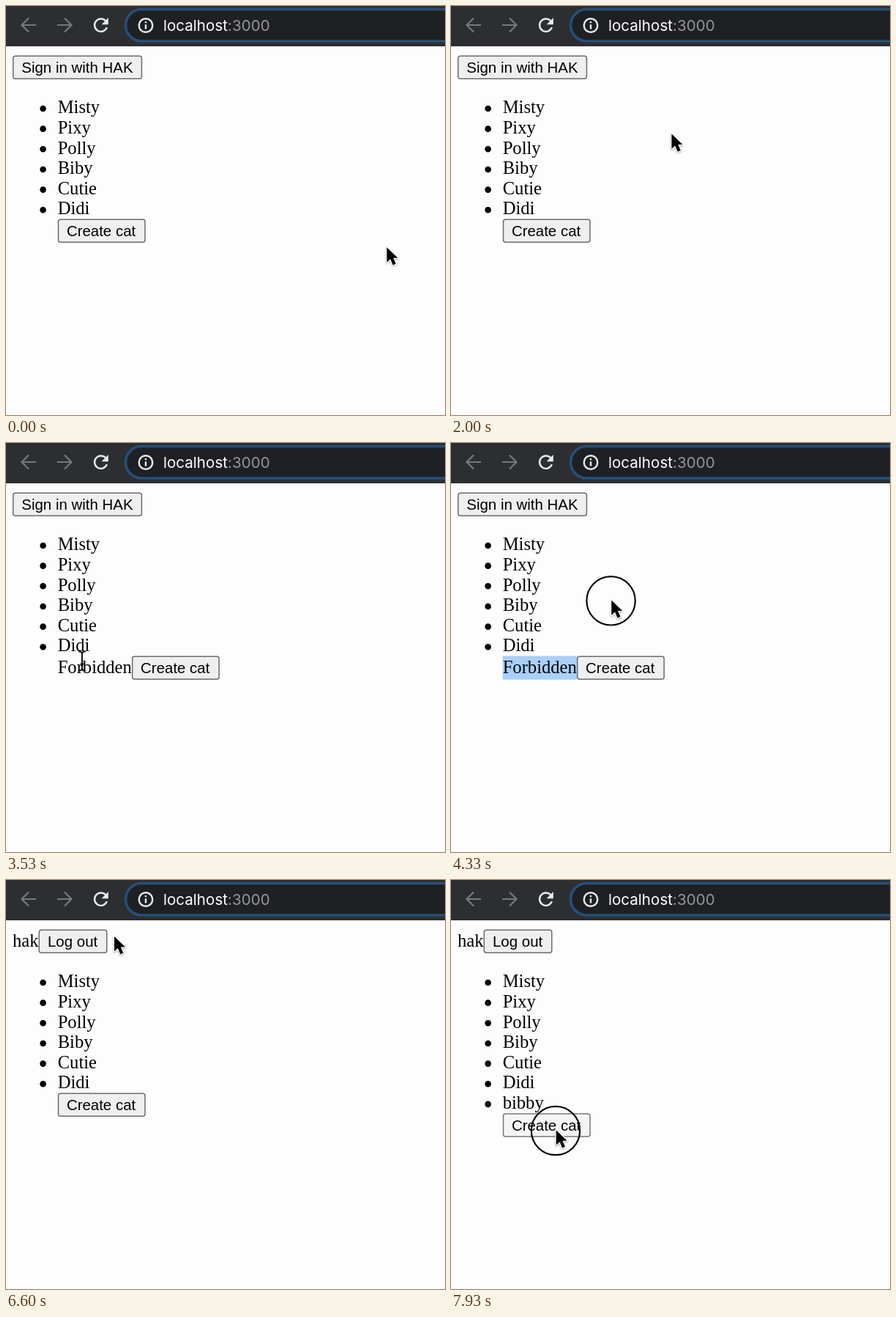
These frames come from a looping animation (600x558 px, 8000 ms). An HTML page:

```html
<!DOCTYPE html>
<html lang="en">
<head>
<meta charset="utf-8">
<title>Cat list</title>
<style>
  html, body { margin: 0; width: 100%; height: 100%; overflow: hidden; background: #fefdfe; }
  svg { display: block; width: 600px; height: 558px; }
  .serif { font: 24.6px "Liberation Serif", serif; }
  .button text { font: 20.45px "Liberation Sans", sans-serif; }
  .button rect { fill: #efeff0; stroke: #6b6b6d; stroke-width: 1.5; }
  .button.hover rect { fill: #dfdde0; stroke: #49494b; }
  .button.active rect { fill: #f5f5f6; stroke: #77777a; }
  .url { font: 20.6px Inter, sans-serif; fill: #fff; }
  .icon { fill: none; stroke: #e8eaed; stroke-width: 2.4; }
  .dim { stroke: #77787b; stroke-width: 2.2; }
  #pointer { filter: drop-shadow(0 1.5px 1.3px rgba(0, 0, 0, .35)); }
</style>
</head>
<body>
<svg viewBox="0 0 600 558">
  <rect width="600" height="558" fill="#fefdfe"/>
  <rect width="600" height="55" fill="#2d2e31"/>
  <rect x="163.5" y="4.5" width="480" height="43.5" rx="21.7" fill="#1f2023" stroke="#24507a" stroke-width="3.6"/>
  <path class="icon dim" d="M41 26H22M31 16.5L21.5 26L31 35.5"/>
  <path class="icon dim" d="M70 26H89M80 16.5L89.5 26L80 35.5"/>
  <g id="reload">
    <path class="icon" d="M136.2 20.3A8.7 8.7 0 1 0 137.9 29.2"/>
    <path fill="#e8eaed" d="M139.8 16V25.2H130.6Z"/>
  </g>
  <path id="stop" class="icon" d="M122 19L137 34M137 19L122 34"/>
  <circle class="icon" cx="191" cy="26.5" r="9.3" stroke-width="2"/>
  <path class="icon" d="M191 25.3V31.5M191 21V23.3"/>
  <text class="url" x="215" y="34">localhost<tspan fill="#96979a">:3000</tspan></text>

  <g id="signIn" class="button">
    <rect x="9.75" y="68.25" width="175.7" height="31" rx="3"/>
    <text x="21.3" y="91">Sign in with HAK</text>
  </g>
  <g id="account">
    <text class="serif" x="9" y="91">hak</text>
    <g class="button">
      <rect x="45.25" y="68.25" width="92.5" height="31" rx="3"/>
      <text x="57" y="91">Log out</text>
    </g>
  </g>

  <g id="cats" class="serif"></g>
  <rect id="selection" x="70.7" y="290.5" width="101.5" height="32.3" fill="#a8d0fa"/>
  <text id="forbidden" class="serif" x="70.7" y="313.7">Forbidden</text>
  <g id="create" class="button">
    <rect x="71.5" y="291.25" width="118.5" height="31" rx="3"/>
    <text x="82.9" y="314">Create cat</text>
  </g>

  <g id="pointer">
    <path id="arrow" d="M0 0V20.5L4.8 16L8.3 24.2L12.3 22.5L8.8 14.5H15Z" fill="#000" stroke="#fff" stroke-width="2.4" stroke-linejoin="round" paint-order="stroke"/>
    <path id="beam" d="M-4.5 -13Q0 -13 0 -10Q0 -13 4.5 -13M0 -10V10M-4.5 13Q0 13 0 10Q0 13 4.5 13M-2.5 4H2.5" fill="none" stroke="#000" stroke-width="1.7"/>
  </g>
  <circle id="ring" cx="-.7" cy=".8" r="33.2" fill="none" stroke="#080808" stroke-width="2.2"/>
</svg>
<script>
  const LOOP = 8000, TICK = 1000 / 15;
  const $ = id => document.getElementById(id);
  const show = (id, on) => { $(id).style.display = on ? "" : "none"; };

  const names = ["Misty", "Pixy", "Polly", "Biby", "Cutie", "Didi", "bibby"];
  $("cats").innerHTML = names.map((name, i) => {
    const y = 146.2 + i * 27.65;
    return `<g id="cat${i}"><circle cx="50.6" cy="${y - 6.2}" r="4.3"/><text x="70.7" y="${y}">${name}</text></g>`;
  }).join("");

  // Pointer moves: start tick, end tick, destination
  const start = [520.5, 329.3];
  const moves = [
    [14, 22, 301.5, 174.5],
    [30, 37, 160, 306.5],
    [44, 53, 104, 297.5],
    [59, 64, 219.3, 214.5],
    [69, 77, 148, 77],
    [99, 107, 163.5, 306.5],
    [115, 118, 143.7, 341.2]
  ];
  // Tick ranges [from, to) of each state
  const presses = [[38, 40], [55, 57], [58, 59], [65, 67], [79, 81], [108, 111], [119, 120]];
  const createHover = [[36, 45], [106, 116], [118, 120]];
  const within = (n, ...ranges) => ranges.some(([a, b]) => n >= a && n < b);
  const ease = p => p * p * (3 - 2 * p);

  function pointerAt(n) {
    let [x, y] = start;
    for (const [a, b, toX, toY] of moves) {
      if (n <= a) break;
      const p = ease(Math.min(1, (n - a) / (b - a)));
      x += (toX - x) * p;
      y += (toY - y) * p;
    }
    return `translate(${x.toFixed(1)} ${y.toFixed(1)})`;
  }

  function render(n) {
    const loggedIn = n >= 90, added = n >= 112;
    const forbidden = within(n, [41, 90]), loading = within(n, [82, 91]);
    const pressed = within(n, ...presses), beam = within(n, [46, 60]);

    show("signIn", !loggedIn);
    show("account", loggedIn);
    show("stop", loading);
    show("reload", !loading);
    show("forbidden", forbidden);
    show("selection", within(n, [58, 66]));
    show("cat6", added);
    show("arrow", !beam);
    show("beam", beam);
    show("ring", pressed);

    const hoverCreate = within(n, ...createHover), hoverSign = within(n, [77, 90]);
    $("create").setAttribute("transform", `translate(${forbidden ? 101.2 : 0} ${added ? 27.7 : 0})`);
    $("create").classList.toggle("hover", hoverCreate);
    $("create").classList.toggle("active", hoverCreate && pressed);
    $("signIn").classList.toggle("hover", hoverSign);
    $("signIn").classList.toggle("active", hoverSign && pressed);

    const place = pointerAt(n);
    $("pointer").setAttribute("transform", place);
    $("ring").setAttribute("transform", place);
  }

  const origin = performance.now();
  function frame() {
    const t = (performance.now() - origin) % LOOP;
    render(Math.min(119, Math.floor((t + 4) / TICK)));
    requestAnimationFrame(frame);
  }
  frame();
</script>
</body>
</html>
```
